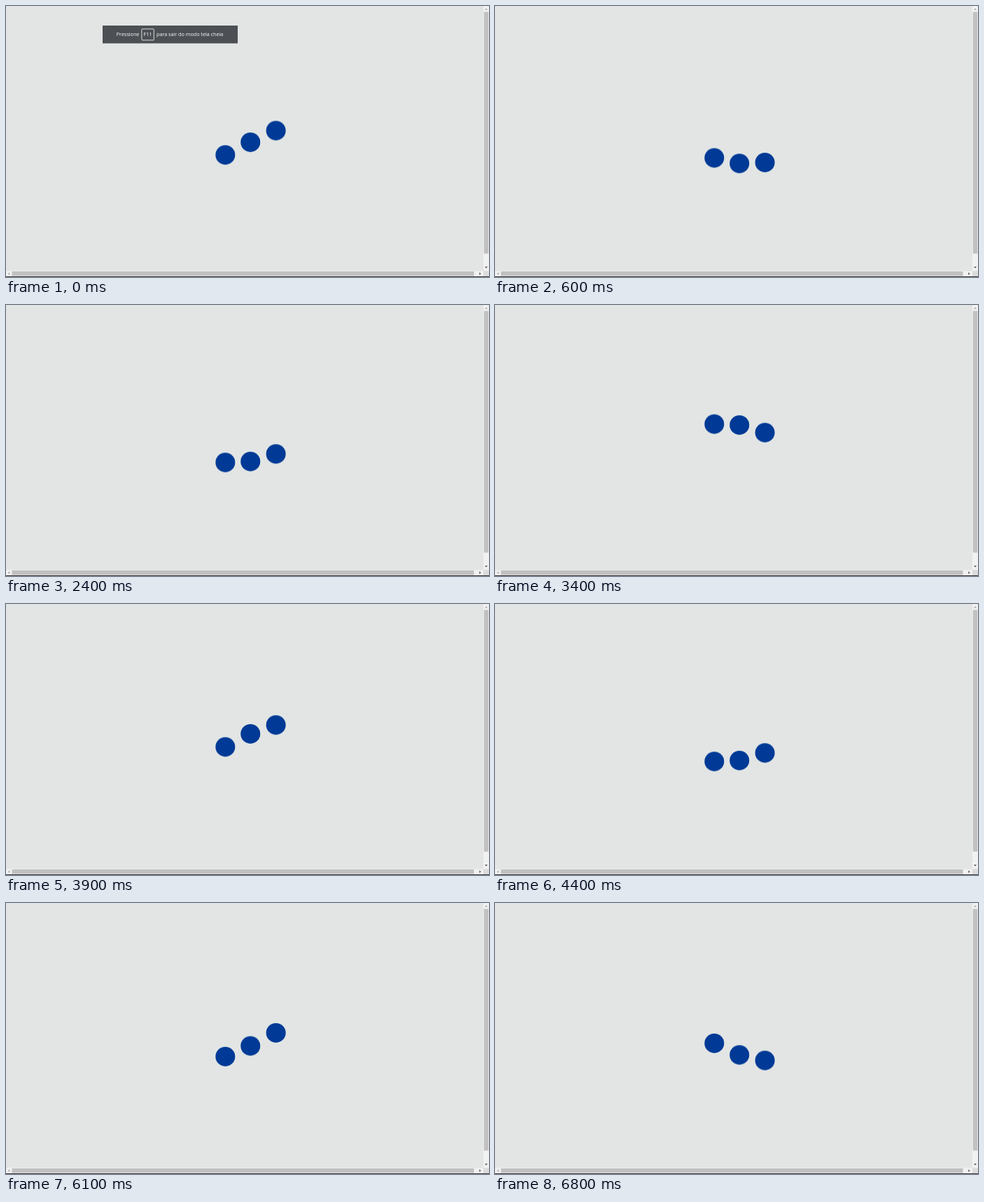
Recreate the animation shown at these times as an HTML page. Size 690 px wide and 388 px high, loop 6.9 s.

```html
<!DOCTYPE html>
<html lang="pt-BR">
<head>
<meta charset="utf-8">
<title>Carregando</title>
<style>
  html, body { margin: 0; width: 100%; height: 100%; overflow: hidden; background: #e2e5e4; }
  svg { display: block; width: 690px; height: 388px; }

  /* --t is the loop time in ms; paused animations are placed by their delay */
  .ball {
    fill: #003a96;
    animation: bounce 1s ease-in-out infinite alternate paused;
    animation-delay: calc((var(--lead) + var(--t)) * -1ms);
  }
  .toast {
    animation: fade .6s linear both paused;
    animation-delay: calc(var(--t) * -1ms);
  }
  @keyframes bounce {
    from { transform: translateY(-28px); }
    to { transform: translateY(28px); }
  }
  @keyframes fade { to { opacity: 0; } }

  .toast text { font: 7.2px "Open Sans", "Noto Sans", sans-serif; fill: #fff; }
  .track { fill: #f1f1f1; }
  .thumb { fill: #c1c1c1; }
  .off { fill: #a3a3a3; }
  .on { fill: #505050; }
</style>
</head>
<body>
<svg id="stage" viewBox="0 0 690 388" style="--t:0">
  <rect width="690" height="388" fill="#e2e5e4"/>

  <g class="toast">
    <rect x="138" y="28" width="193" height="25.5" fill="#4c5054"/>
    <rect x="193.9" y="32.9" width="17.4" height="16" rx="1" fill="none" stroke="#fff" stroke-width=".8"/>
    <text x="157.8" y="43.4">Pressione</text>
    <text x="196.6" y="43.4">F11</text>
    <text x="215" y="43.4">para sair do modo tela cheia</text>
  </g>

  <circle class="ball" style="--lead:670" cx="313.3" cy="197.9" r="14"/>
  <circle class="ball" style="--lead:470" cx="349.2" cy="197.9" r="14"/>
  <circle class="ball" style="--lead:270" cx="385.6" cy="197.9" r="14"/>

  <!-- scrollbars -->
  <rect class="track" x="682" width="8" height="379.5"/>
  <rect class="track" y="379.5" width="682" height="7.5"/>
  <rect x="682" y="379.5" width="8" height="7.5" fill="#dcdcdc"/>
  <rect class="thumb" x="682.8" y="8.5" width="6.4" height="346"/>
  <rect class="thumb" x="8.5" y="380" width="660" height="6.4"/>
  <path class="off" d="M684 5.5l2-2.2 2 2.2zM5.2 381.3l-2.2 2 2.2 2z"/>
  <path class="on" d="M684 373.2l2 2.2 2-2.2zM676.3 381.3l2.2 2-2.2 2z"/>

  <rect y="387" width="690" height="1" fill="#38343a"/>
</svg>
<script>
  const LOOP = 6900, STEP = 100;
  const stage = document.getElementById("stage");
  const start = performance.now();

  function draw() {
    const time = (performance.now() - start) % LOOP;
    stage.style.setProperty("--t", Math.floor(time / STEP) * STEP);
    requestAnimationFrame(draw);
  }
  draw();
</script>
</body>
</html>
```
